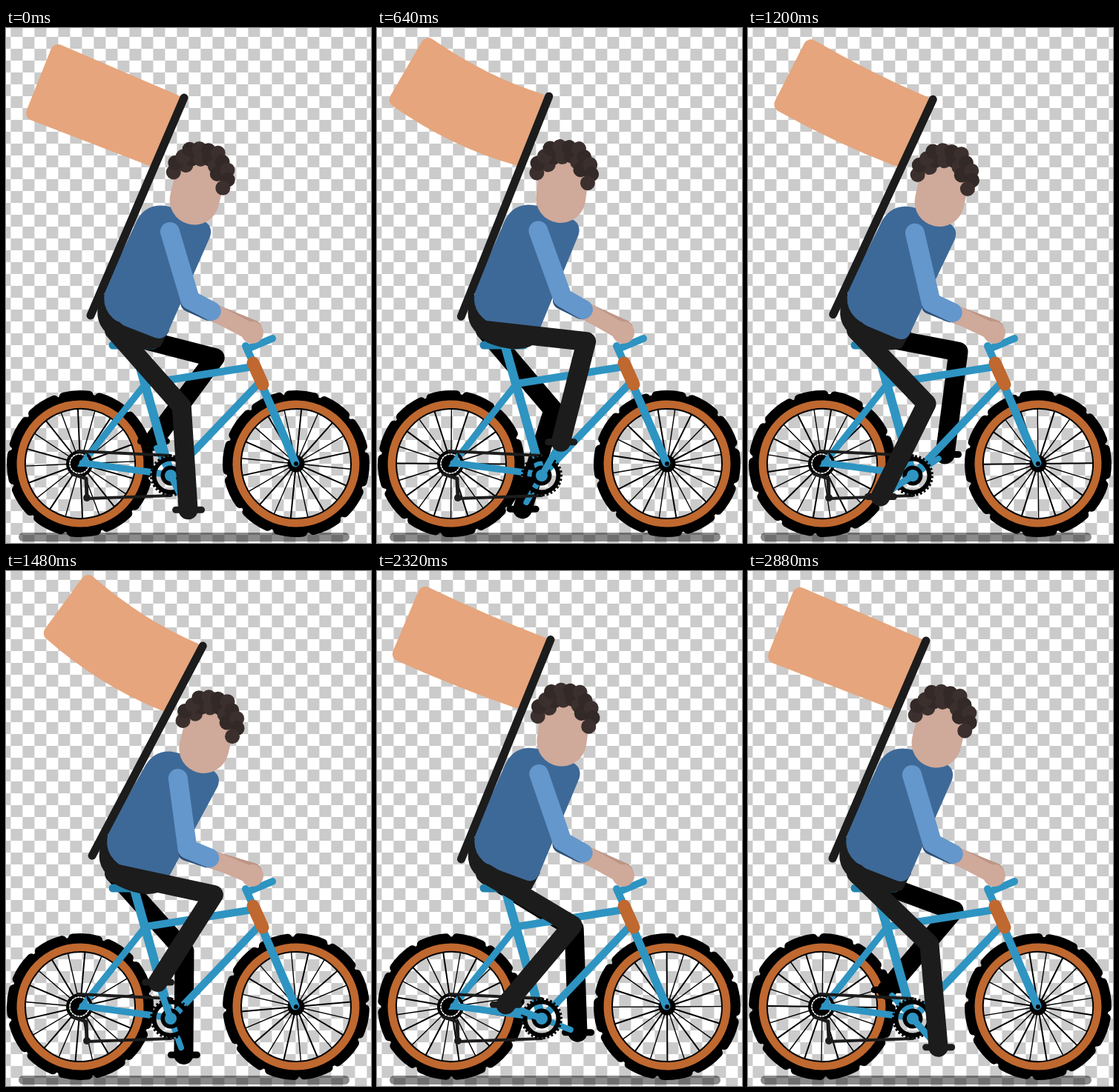
These frames come from a looping animation (492x695 px, 2.92 s). An HTML page with a canvas:

```html
<!DOCTYPE html>
<html lang="en">
<head>
<meta charset="utf-8">
<title>Cyclist with a flag</title>
<style>
html, body { margin: 0; width: 100%; height: 100%; overflow: hidden; }
canvas { display: block; }
</style>
</head>
<body>
<canvas id="stage" width="492" height="695"></canvas>
<script>
const ctx = document.getElementById('stage').getContext('2d');
const LOOP = 2920, STEP = 40, TURNS = 3, TAU = Math.PI * 2, RAD = Math.PI / 180;
const BLUE = '#2e94c2', ORANGE = '#bf682f', DARK = '#1c1c1c', BLACK = '#000', SKIN = '#cfa99a';
const CRANK = [222, 604], HIP = [146, 408], FAR_HIP = [149, 411], HAND = [332, 411], PIVOT = [164, 413];

// Turning points as [time, value]
const LEAN = [[0, 0], [450, -1.6], [900, -1.25], [1500, 4.6], [2260, -1.1], [LOOP, 0]];
const WAVE = [[0, 0], [380, 1], [950, 0], [1560, 0.6], [2240, 0.05], [2560, 0.7], [2880, 0], [LOOP, 0]];

function swing(keys, t) {
  const i = keys.findIndex(k => k[0] > t), [t0, a] = keys[i - 1], [t1, b] = keys[i];
  return a + (b - a) * (1 - Math.cos(Math.PI * (t - t0) / (t1 - t0))) / 2;
}

function line(color, width, ...points) {
  ctx.beginPath();
  for (const [x, y] of points) ctx.lineTo(x, y);
  ctx.strokeStyle = color;
  ctx.lineWidth = width;
  ctx.stroke();
}

function disc(color, x, y, r) {
  ctx.beginPath();
  ctx.arc(x, y, r, 0, TAU);
  ctx.fillStyle = color;
  ctx.fill();
}

function ring(color, r, width, dash = []) {
  ctx.beginPath();
  ctx.setLineDash(dash);
  ctx.arc(0, 0, r, 0, TAU);
  ctx.strokeStyle = color;
  ctx.lineWidth = width;
  ctx.stroke();
  ctx.setLineDash([]);
}

function shape(color, d) {
  ctx.fillStyle = color;
  ctx.fill(new Path2D(d));
}

// Draws around a turned origin
function spun(x, y, angle, paint) {
  ctx.save();
  ctx.translate(x, y);
  ctx.rotate(angle);
  paint();
  ctx.restore();
}

// Draws in stage coordinates, turned about a point
function rotated(x, y, angle, paint) {
  spun(x, y, angle, () => {
    ctx.translate(-x, -y);
    paint();
  });
}

// Middle joint of a two-part limb; side picks the bend
function joint(a, b, l1, l2, side) {
  const dx = b[0] - a[0], dy = b[1] - a[1], d = Math.hypot(dx, dy);
  const along = (l1 * l1 + d * d - l2 * l2) / (2 * d);
  const off = side * Math.sqrt(Math.max(0, l1 * l1 - along * along));
  return [a[0] + (dx * along + dy * off) / d, a[1] + (dy * along - dx * off) / d];
}

const mix = (a, b, u) => [a[0] + (b[0] - a[0]) * u, a[1] + (b[1] - a[1]) * u];

function backdrop() {
  ctx.fillStyle = '#fff';
  ctx.fillRect(0, 0, 492, 695);
  ctx.fillStyle = '#cbcbcb';
  for (let j = 0; j < 45; j++)
    for (let i = 1 - j % 2; i < 32; i += 2) ctx.fillRect(i * 16 - 9.6, j * 16 - 4, 16, 16);
  line('rgba(0,0,0,.46)', 12, [23, 687], [457, 687]);
}

function wheel(x, y, turn) {
  const pitch = TAU * 93 / 12;
  spun(x, y, turn - 104 * RAD, () => {
    ring(BLACK, 89, 11);
    ring(BLACK, 93, 12, [pitch * 0.71, pitch * 0.29]);
    ring(ORANGE, 80, 11);
    ring(BLACK, 74, 2);
    for (let i = 0; i < 20; i++) {
      const a = (i * 18 + 11.6) * RAD;
      line(BLACK, i % 2 ? 1.4 : 2, [0, 0], [74 * Math.cos(a), 74 * Math.sin(a)]);
    }
  });
}

function leg(color, hip, foot) {
  line(color, 9, [foot[0] - 17, foot[1]], [foot[0] + 18, foot[1]]);
  line(color, 26, hip, joint(hip, foot, 137, 140, 1), foot);
}

function frame() {
  line('#2381ad', 11, [144, 428], [198, 428]);
  line(BLUE, 12, [173, 430], CRANK);
  line(BLUE, 10, [188, 480], [333, 457]);
  line(BLUE, 10, CRANK, [342, 478]);
  line(BLUE, 9, [188, 480], [103, 587]);
  disc(BLACK, 391, 588, 11.5);
  line(BLUE, 11, [345, 482], [390, 587]);
  disc(BLACK, 391, 588, 3);
  line(BLUE, 10, [323, 429], [336, 458]);
  line(BLUE, 10, [328, 432], [359, 419]);
  line(ORANGE, 17, [333, 452], [346, 481]);
}

function drive(turn) {
  disc(BLACK, 99, 588, 18);
  spun(99, 588, turn, () => ring('#fff', 13, 1.6, [2, 2]));
  line(BLUE, 9, [103, 587], [222, 603]);
  shape(BLUE, 'M96,592 L108,573 L113,592 Z');
  line(DARK, 4, [97, 571], [222, 577]);
  line(DARK, 5, [90, 602], [108, 608], [109, 632]);
  line(DARK, 4, [109, 635], [222, 631]);
  disc(DARK, 109, 634, 5);
  spun(...CRANK, turn, () => {
    ctx.lineCap = 'butt';
    ring(BLACK, 22.5, 6);
    ring(BLACK, 26, 4, [2.72, 2.72]);
    ring(BLACK, 10.5, 6);
  });
  disc(BLUE, ...CRANK, 8);
}

// k bends the cloth from flat (0) to fully lifted (1)
function flag(k) {
  ctx.beginPath();
  ctx.moveTo(228, 100);
  ctx.quadraticCurveTo(151 + 4 * k, 67 + 14 * k, 70 + 16 * k, 32 - 19.5 * k);
  ctx.lineTo(37 - 4 * k, 115 - 38 * k);
  ctx.quadraticCurveTo(115 - 7 * k, 145 + 9 * k, 195, 176);
  ctx.closePath();
  ctx.fillStyle = ctx.strokeStyle = '#e6a57c';
  ctx.lineWidth = 20;
  ctx.fill();
  ctx.stroke();
}

// A row of curls on an arc around the skull
function curls(count, radius, from, to) {
  for (let i = 0; i < count; i++) {
    const a = (from + (to - from) * i / (count - 1)) * RAD, r = radius + 2 * Math.sin(i * 2.4);
    disc(i % 2 ? '#332927' : '#3b302d', 262 + r * Math.cos(a), 199 + r * Math.sin(a), 10);
  }
}

function head() {
  line(SKIN, 67, [254, 232], [261, 204]);
  curls(6, 24, 215, 355);
  curls(11, 36.5, 187, 389);
}

function torso() {
  shape(DARK, 'M130,358 Q114,392 136,412 L148,424 Q185,440 208,430 L220,408 Z');
  shape('#3d6998', 'M174,265 Q184,240 208,239.5 Q222,240 234,246 L264,259 Q280,266 275,282 ' +
    'L219,409 Q214,422 201,418 L160,402 Q122,384 136,346 Z');
}

function arm(lean) {
  const dx = 57, dy = -138, c = Math.cos(lean), s = Math.sin(lean);
  const shoulder = [PIVOT[0] + dx * c - dy * s, PIVOT[1] + dx * s + dy * c];
  const elbow = joint(shoulder, HAND, 96, 94.5, -1), cuff = mix(elbow, HAND, 0.34);
  const farElbow = [elbow[0] - 1, elbow[1] + 4];
  line('#bd9585', 24, farElbow, [333, 406]);
  line('#2b5079', 24, farElbow, [cuff[0] - 3, cuff[1] + 1]);
  line(SKIN, 23, cuff, HAND);
  disc(SKIN, ...HAND, 15);
  line('#6497cc', 26, shoulder, elbow, cuff);
}

function draw(t) {
  const turn = t / LOOP * TURNS * TAU, lean = swing(LEAN, t) * RAD;
  const nod = -6.8 * RAD * Math.sin(TAU * t / LOOP) ** 2;
  const angle = turn + 63 * RAD, px = 52 * Math.cos(angle), py = 52 * Math.sin(angle);
  const near = [CRANK[0] + px, CRANK[1] + py], far = [CRANK[0] - px, CRANK[1] - py];

  backdrop();
  wheel(100, 588, turn);
  wheel(391, 588, turn + 8 * RAD);
  leg(BLACK, FAR_HIP, far);
  line(BLUE, 8, CRANK, mix(CRANK, far, 0.8));
  frame();
  drive(turn);
  line(BLUE, 9, CRANK, near);

  rotated(...PIVOT, lean, () => {
    flag(swing(WAVE, t));
    torso();
    line(DARK, 11, [114, 388], [240, 94]);
    rotated(250, 250, nod - lean, head);
  });
  leg(DARK, HIP, near);
  arm(lean);
}

ctx.lineCap = ctx.lineJoin = 'round';
const start = performance.now();
function tick() {
  const t = Math.max(0, performance.now() - start) % LOOP;
  draw(Math.floor(t / STEP) * STEP);
  requestAnimationFrame(tick);
}
tick();
</script>
</body>
</html>
```
